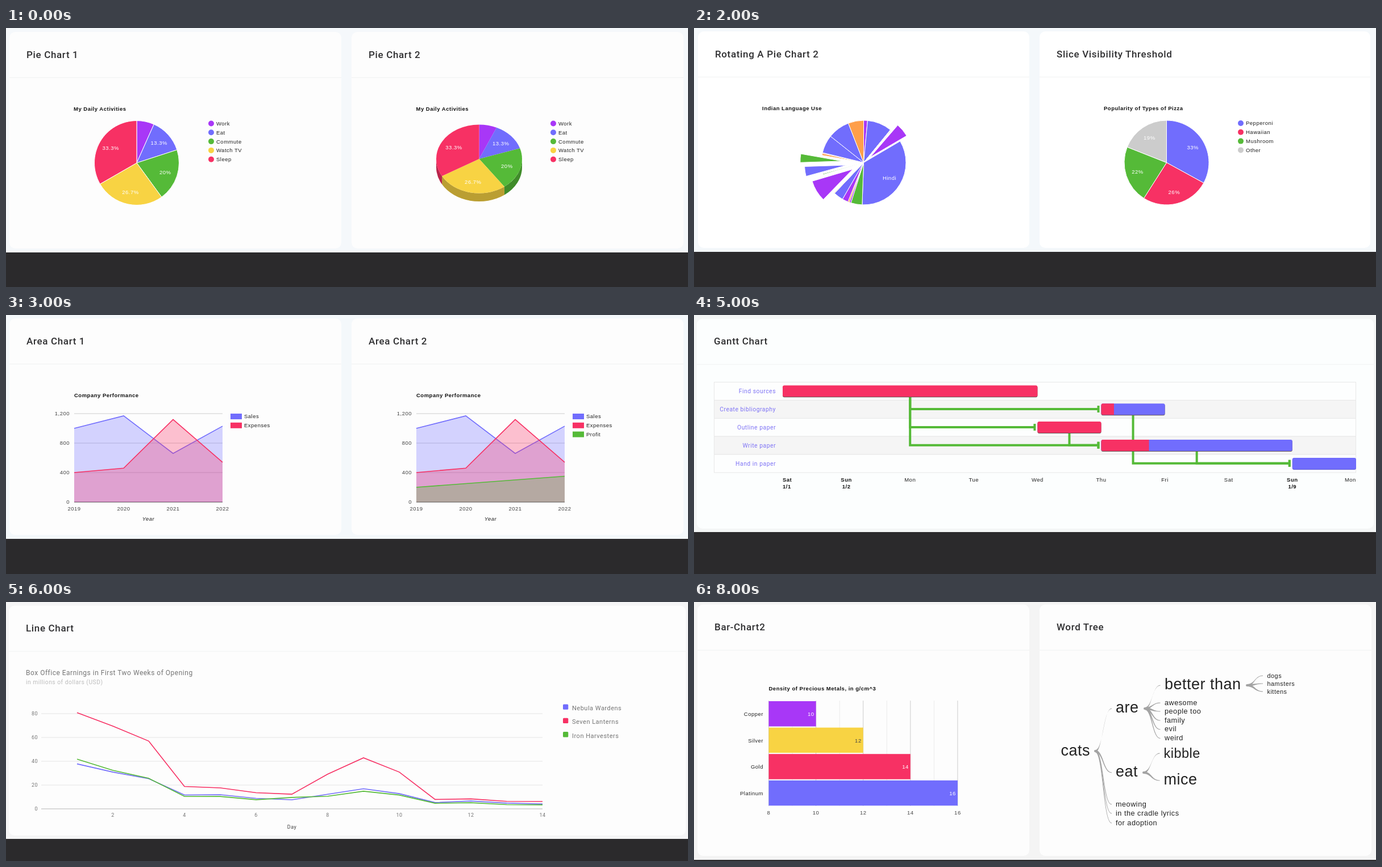
Write an HTML page that moves like this. It is 1200x457 px and loops after 9000 ms.

```html
<!DOCTYPE html>
<html lang="en">
<head>
<meta charset="utf-8">
<title>Chart gallery</title>
<style>
  html, body { margin: 0; width: 100%; height: 100%; overflow: hidden; background: #2b2a2c; }
  svg { display: block; width: 1200px; height: 457px; }
  text { font-family: "Liberation Sans", Arial, sans-serif; letter-spacing: .5px; fill: #222; white-space: pre; }
  .ui { font-family: Roboto, sans-serif; }
  .heading { font-family: Roboto, sans-serif; font-weight: 500; letter-spacing: .65px; fill: #2f2f31; }
  .bold { font-weight: 700; fill: #111; }
  .italic { font-style: italic; }
  .axis { fill: #444; }
  .soft { fill: #757575; }
  .faint { fill: #bdbdbd; }
  .light { fill: #fff; }
  .task { fill: #7f74f5; }
  .end { text-anchor: end; }
  .mid { text-anchor: middle; }
</style>
</head>
<body>
<svg id="stage" viewBox="0 0 1200 457"></svg>
<script>
const BLUE = '#716dfd', PINK = '#f73164', GREEN = '#55ba38', YELLOW = '#f8d343',
      PURPLE = '#a837f7', ORANGE = '#ff9f4a', GRAY = '#cccccc';
const SCENE_MS = 1000;
const join = (list, fn) => list.map(fn).join('');

// y is the middle of the capital letters.
const text = (x, y, content, size = 9.5, cls = '', extra = '') =>
  `<text x="${x}" y="${y + size * .36}" font-size="${size}" class="${cls}" ${extra}>${content}</text>`;
const sideText = (x, y, content, size) =>
  text(0, 0, content, size, 'italic mid', `transform="translate(${x} ${y}) rotate(-90)"`);
const rect = (x, y, w, h, fill, r = 0) =>
  `<rect x="${x}" y="${y}" width="${w}" height="${h}" rx="${r}" fill="${fill}"/>`;
const line = (x1, y1, x2, y2, color = '#ccc', width = 1) =>
  `<path d="M${x1} ${y1}L${x2} ${y2}" stroke="${color}" stroke-width="${width}"/>`;
const polyline = (points, color, width) =>
  `<polyline points="${points.join(' ')}" fill="none" stroke="${color}" stroke-width="${width}"/>`;

const card = (x, y, w, h, title, fill) => rect(x, y, w, h, fill, 10) +
  line(x, y + 80.5, x + w, y + 80.5, '#f0f2f2') + text(x + 30, y + 39.5, title, 17, 'heading');

function page({ bg, bottom, cards, fill = '#fdfdfd' }, content) {
  return rect(0, 0, 1200, bottom, bg) + rect(0, bottom, 1200, 457 - bottom, '#2b2a2c') +
    join(cards, ([x, y, w, h, title]) => card(x, y, w, h, title, fill)) + content;
}

const dotLegend = (x, y, entries) => join(entries, ([name, color], i) =>
  `<circle cx="${x}" cy="${y + i * 15.8}" r="5" fill="${color}"/>` + text(x + 9, y + i * 15.8, name));

// Angles run clockwise in degrees from twelve o'clock.
function pie({ cx, cy, rx = 74.5, ry = rx, values, colors, labels = [], offsets = {},
               start = 0, depth = 0, hole = 0, labelAt = .71 }) {
  const total = values.reduce((a, b) => a + b);
  const at = (deg, k, dy = 0) => {
    const a = deg * Math.PI / 180;
    return `${cx + rx * k * Math.sin(a)} ${cy - ry * k * Math.cos(a) + dy}`;
  };
  let angle = start, sides = '', tops = '', captions = '';
  values.forEach((value, i) => {
    const from = angle, to = angle += value / total * 360, middle = (from + to) / 2;
    const large = +(to - from > 180);
    const a = Math.max(from, 90), b = Math.min(to, 270);
    if (depth && b > a) {
      const side = `M${at(a, 1)}A${rx} ${ry} 0 0 1 ${at(b, 1)}L${at(b, 1, depth)}A${rx} ${ry} 0 0 0 ${at(a, 1, depth)}Z`;
      sides += `<path d="${side}" fill="${colors[i]}"/><path d="${side}" fill="#000" opacity=".25"/>`;
    }
    const [sx, sy] = at(middle, offsets[i] || 0).split(' ');
    tops += `<path d="M${cx} ${cy}L${at(from, 1)}A${rx} ${ry} 0 ${large} 1 ${at(to, 1)}Z" fill="${colors[i]}"
      transform="translate(${sx - cx} ${sy - cy})" ${depth ? '' : 'stroke="#fff"'}/>`;
    if (labels[i]) {
      const [x, y] = at(middle, labelAt).split(' ').map(Number);
      captions += text(x, y, labels[i], 9.5, 'light mid');
    }
  });
  const middle = hole ? `<circle cx="${cx}" cy="${cy}" r="${rx * hole}" fill="#fff"/>` : '';
  return sides + tops + middle + captions;
}

const years = [2019, 2020, 2021, 2022];
const company = [[1000, 1170, 660, 1030], [400, 460, 1120, 540], [200, 250, 300, 350]];
const activities = {
  values: [1, 2, 3, 4, 5],
  colors: [PURPLE, BLUE, GREEN, YELLOW, PINK],
  labels: ['', '13.3%', '20%', '26.7%', '33.3%']
};
const activityLegend = x => dotLegend(x, 168.5,
  ['Work', 'Eat', 'Commute', 'Watch TV', 'Sleep'].map((name, i) => [name, activities.colors[i]]));

const pieCharts = () => page(
  { bg: '#f5f8fb', bottom: 396, cards: [[6, 7, 584, 382, 'Pie Chart 1'], [608, 7, 584, 382, 'Pie Chart 2']] },
  text(119, 142.5, 'My Daily Activities', 9.5, 'bold') + pie({ cx: 230, cy: 238, ...activities }) + activityLegend(361) +
  text(721.5, 142.5, 'My Daily Activities', 9.5, 'bold') +
  pie({ cx: 832.5, cy: 231, rx: 75.5, ry: 60.5, depth: 14.5, labelAt: .68, ...activities }) + activityLegend(963));

const donutAndRotation = () => page(
  { bg: '#f5f8fb', bottom: 396, cards: [[6, 7, 584, 382, 'Pie Chart 3'], [608, 7, 584, 382, 'Rotating A Pie Chart 1']] },
  text(119, 142.5, 'My Daily Activities', 9.5, 'bold') +
  pie({ cx: 230, cy: 238, hole: .4, ...activities }) + activityLegend(361) +
  text(721.5, 142.5, 'Swiss Language Use (100 degree rotation)', 9.5, 'bold') +
  pie({ cx: 900, cy: 238, start: 100, values: [5.85, 1.66, .316, .0791],
        colors: [BLUE, PINK, GREEN, PURPLE], labels: ['German', 'French'] }));

function languagesAndPizza() {
  const speakers = [13, 83, 1.4, 2.3, 46, 300, 38, 5.5, 5, 20, 33, 1.5, 72, 2.9, 33, 29, .01, 6.5, 2.5, 61, 74, 52];
  const colors = [PURPLE, BLUE, GRAY, GRAY, PURPLE, BLUE, GREEN, PURPLE, ORANGE, PURPLE, BLUE,
    YELLOW, PURPLE, GREEN, BLUE, GREEN, BLUE, ORANGE, PINK, BLUE, BLUE, ORANGE];
  const toppings = [['Pepperoni', BLUE], ['Hawaiian', PINK], ['Mushroom', GREEN], ['Other', GRAY]];
  return page(
    { bg: '#f4f8fb', bottom: 395, fill: '#fff',
      cards: [[7, 6, 583, 382, 'Rotating A Pie Chart 2'], [608, 6, 582, 382, 'Slice Visibility Threshold']] },
    text(120, 142, 'Indian Language Use', 9.5, 'bold') +
    pie({ cx: 298.5, cy: 237.5, values: speakers, colors, labels: { 5: 'Hindi' },
          offsets: { 4: .2, 12: .3, 14: .4, 15: .5 } }) +
    text(721, 142, 'Popularity of Types of Pizza', 9.5, 'bold') +
    pie({ cx: 831.5, cy: 237.5, values: [33, 26, 22, 19], colors: toppings.map(t => t[1]),
          labels: ['33%', '26%', '22%', '19%'], labelAt: .72 }) +
    dotLegend(962, 168, toppings));
}

function areaCharts() {
  const area = (x, count) => {
    const px = i => x + i * 87, py = v => 330 - v * .13;
    return text(x, 142, 'Company Performance', 9.5, 'bold') +
      join([0, 400, 800, 1200], v => line(x, py(v), px(3), py(v), v ? '#ccc' : '#333') +
        text(x - 8, py(v), v.toLocaleString('en-US'), 9.5, 'axis end')) +
      join(company.slice(0, count), (row, s) => {
        const color = [BLUE, PINK, GREEN][s], points = row.map((v, i) => `${px(i)},${py(v)}`);
        return `<polygon points="${points.join(' ')} ${px(3)},330 ${x},330" fill="${color}" opacity=".3"/>` +
          polyline(points, color, 1.6);
      }) +
      join(years, (year, i) => text(px(i), 342, year, 9.5, 'axis mid')) +
      text(px(1.5), 360, 'Year', 9.5, 'italic mid') +
      join(['Sales', 'Expenses', 'Profit'].slice(0, count), (name, i) =>
        rect(px(3) + 14, 174 + i * 15.8, 20, 10, [BLUE, PINK, GREEN][i]) + text(px(3) + 38, 179 + i * 15.8, name));
  };
  return page(
    { bg: '#f4f8fb', bottom: 395, cards: [[6, 6, 584, 382, 'Area Chart 1'], [608, 6, 584, 382, 'Area Chart 2']] },
    area(120, 2) + area(722, 3));
}

function barAndColumns() {
  const cities = [
    ['New York City, NY', 8.175, 8.008], ['Los Angeles, CA', 3.792, 3.694], ['Chicago, IL', 2.695, 2.896],
    ['Houston, TX', 2.099, 1.953], ['Philadelphia, PA', 1.526, 1.517]];
  const px = millions => 166.5 + millions * 26.2;
  const bars = text(166, 155.5, 'Population of Largest U.S. Cities', 9.5, 'bold') +
    join([0, 2.5, 5, 7.5, 10], m => (m ? line(px(m), 177, px(m), 363) : '') +
      text(px(m), 374, (m * 1e6).toLocaleString('en-US'), 9.5, 'axis mid')) +
    join(cities, ([name, now, before], i) => {
      const y = 184 + i * 37.2;
      return rect(166.5, y, now * 26.2, 11.2, BLUE) + rect(166.5, y + 12, before * 26.2, 11.2, PINK) +
        text(157, y + 11.5, name, 9.5, 'end');
    }) +
    line(166.5, 177, 166.5, 363, '#333') +
    join(['2020 Population', '2018 Population'], (name, i) =>
      rect(438.5, 176.5 + i * 15.8, 19.5, 9.8, [BLUE, PINK][i]) + text(462, 181.5 + i * 15.8, name)) +
    sideText(53, 270, 'City') + text(297.5, 400, 'Total Population', 9.5, 'italic mid');

  const columns = text(638, 125, 'Company Performance', 12, 'ui soft') +
    text(638, 141.5, 'Sales, Expenses, and Profit: 2019-2022', 10.3, 'ui faint') +
    join(['0', '200', '400', '600', '800', '1K', '1.2K'], (label, i) => {
      const y = 381 - i * 33.4;
      return line(663, y, 1071.5, y, i ? '#e4e4e4' : '#b5b5b5') + text(657.5, y, label, 9, 'ui soft end');
    }) +
    join(company, (row, s) => join(row, (value, i) => {
      const x = 671.3 + i * 107.3 + s * 23.3, y = 381 - value * .167;
      return `<path d="M${x} 380.5V${y + 1.5}q0-1.5 1.5-1.5h19.5q1.5 0 1.5 1.5V380.5Z" fill="${[BLUE, PINK, GREEN][s]}"/>`;
    })) +
    join(years, (year, i) => text(706 + i * 107.3, 391, year, 9, 'ui soft mid')) +
    text(867, 415, 'Year', 9, 'ui axis mid') +
    '<clipPath id="legend"><path d="M1100 170h63v80h-63z"/></clipPath><g clip-path="url(#legend)">' +
    join(['Sales', 'Expenses', 'Profit'], (name, i) => rect(1102.5, 180.5 + i * 24.3, 9.3, 9.3, [BLUE, PINK, GREEN][i], 1.5) +
      text(1118, 187 + i * 24.3, name, 11, 'ui soft')) + '</g>';
  return page(
    { bg: '#f5faf5', bottom: 457, cards: [[5, 6.5, 585, 444, 'Basic Bar Chart'], [608, 6.5, 585, 444, 'Material Design']] },
    bars + columns);
}

function gantt() {
  const dayX = day => 156 + day * 112.1, rowY = row => 118.5 + row * 31.9;
  // name, first day, last day, share complete
  const tasks = [['Find sources', 0, 4, 1], ['Create bibliography', 5, 6, .2], ['Outline paper', 4, 5, 1],
    ['Write paper', 5, 8, .25], ['Hand in paper', 8, 9, 0]];
  const links = [[0, 1], [0, 2], [0, 3], [2, 3], [1, 4], [3, 4]];
  const days = ['Sat', 'Sun', 'Mon', 'Tue', 'Wed', 'Thu', 'Fri', 'Sat', 'Sun', 'Mon'];
  const dates = { 0: '1/1', 1: '1/2', 8: '1/9' };
  return page(
    { bg: '#f4f6f6', bottom: 383, fill: '#fcfefe', cards: [[5, 6.5, 1191, 370.5, 'Gantt Chart']] },
    join(tasks, (task, i) => `<rect x="35.5" y="${rowY(i)}" width="1129" height="31.9"
      fill="${i % 2 ? '#f5f5f5' : '#fdfefe'}" stroke="#e8e8e8"/>` + text(144, rowY(i) + 16, task[0], 10.4, 'ui task end')) +
    join(links, ([a, b]) => {
      const x = dayX((tasks[a][1] + tasks[a][2]) / 2), y = rowY(b) + 15.6, tip = dayX(tasks[b][1]) - 5;
      return `<path d="M${x} ${rowY(a) + 26}V${y}H${tip}M${tip} ${y - 6}v12" fill="none" stroke="${GREEN}" stroke-width="4"/>`;
    }) +
    join(tasks, ([, from, to, done], i) => {
      const x = dayX(from), y = rowY(i) + 5.8, w = dayX(to) - x, cut = w * done;
      return rect(x, y + 1, w, 20, done ? '#655' : '#5c58d0', 3) + rect(x, y, w, 20, done === 1 ? PINK : BLUE, 3) +
        (done && done < 1 ? `<path d="M${x + cut} ${y}h${3 - cut}q-3 0-3 3v14q0 3 3 3h${cut - 3}z" fill="${PINK}"/>` : '');
    }) +
    join(days, (name, i) => {
      const cls = (i === 0 ? '' : i === 9 ? 'end ' : 'mid ') + (dates[i] ? 'bold' : '');
      return text(dayX(i), 291, name, 9.5, cls) + (dates[i] ? text(dayX(i), 302.5, dates[i], 9.5, cls) : '');
    }));
}

function lineChart() {
  const series = [
    ['Nebula Wardens', BLUE, [37.8, 30.9, 25.4, 11.7, 11.9, 8.8, 7.6, 12.3, 16.9, 12.8, 5.3, 6.6, 4.8, 4.2]],
    ['Seven Lanterns', PINK, [80.8, 69.5, 57, 18.8, 17.6, 13.6, 12.3, 29.2, 42.9, 30.9, 7.9, 8.4, 6.3, 6.2]],
    ['Iron Harvesters', GREEN, [41.8, 32.4, 25.7, 10.5, 10.4, 7.7, 9.6, 10.6, 14.8, 11.6, 4.7, 5.2, 3.6, 3.4]]];
  const px = day => 62 + day * 63, py = v => 365 - v * 2.1;
  return page(
    { bg: '#f5f5f6', bottom: 418, cards: [[5, 6.5, 1191, 405.5, 'Line Chart']] },
    text(35, 125, 'Box Office Earnings in First Two Weeks of Opening', 12, 'ui soft') +
    text(35, 141.5, 'in millions of dollars (USD)', 10.3, 'ui faint') +
    join([0, 20, 40, 60, 80], v => line(62, py(v), px(14), py(v), v ? '#e4e4e4' : '#b5b5b5') +
      text(56, py(v), v, 9, 'ui soft end')) +
    join([2, 4, 6, 8, 10, 12, 14], day => text(px(day), 376, day, 9, 'ui soft mid')) +
    text(px(7), 397, 'Day', 9, 'ui axis mid') +
    join(series, ([name, color, values], i) => polyline(values.map((v, d) => `${px(d + 1)},${py(v)}`), color, 1.6) +
      rect(980, 180.5 + i * 24.3, 9.3, 9.3, color, 1.5) + text(996, 187 + i * 24.3, name, 11, 'ui soft')));
}

function comboChart() {
  const months = ['2018/05', '2019/06', '2020/07', '2021/08', '2022/09'];
  const countries = [
    [BLUE, [165, 135, 157, 139, 136]], [GREEN, [938, 1120, 1167, 1110, 691]], [PINK, [522, 599, 587, 615, 629]],
    [PURPLE, [998, 1268, 807, 968, 1026]], [YELLOW, [450, 288, 397, 215, 366]]];
  const average = [614.6, 682, 623, 609.4, 569.6];
  const px = i => 243.6 + i * 178.1, py = v => 297.7 - v * .0928;
  const legend = [['Bolivia', 164], ['Ecuador', 182.3], ['Madagascar', 200.4], ['Papua New', 218.5], ['Rwanda', 252]];
  return page(
    { bg: '#f6f5f6', bottom: 380, cards: [[5, 2.5, 1189, 370, 'ComboChart']] },
    text(154, 136, 'Monthly Coffee Production by Country', 11, 'bold') +
    join([250, 750, 1250], v => line(154, py(v), 1045, py(v), '#ebebeb')) +
    join([0, 500, 1000, 1500], v => line(154, py(v), 1045, py(v)) +
      text(143.5, py(v) + .5, v.toLocaleString('en-US'), 11, 'axis end')) +
    join(countries, ([color, cups], s) => join(cups, (v, i) =>
      rect(px(i) - 55.4 + s * 22.2, py(v), 21.7, v * .0928, color))) +
    line(154, 297.7, 1045, 297.7, '#333') +
    polyline(average.map((v, i) => `${px(i)},${py(v)}`), BLUE, 1.6) +
    join(months, (month, i) => text(px(i), 311, month, 11, 'mid')) +
    text(599.5, 329, 'Month', 11, 'italic mid') + sideText(74, 228, 'Cups', 11) +
    join(legend, ([name, y], i) => rect(1056, y - 5.7, 23, 11.4, countries[i][0]) + text(1083.5, y, name, 11)) +
    text(1083.5, 233.5, 'Guinea', 11) + line(1056, 270, 1079, 270, BLUE, 1.6) + text(1083.5, 270, 'Average', 11));
}

function metalsAndWords() {
  const metals = [['Copper', 10, PURPLE], ['Silver', 12, YELLOW], ['Gold', 14, PINK], ['Platinum', 16, BLUE]];
  const px = v => 131.5 + (v - 8) * 41.55;
  const bars = text(131.5, 153, 'Density of Precious Metals, in g/cm^3', 9.5, 'bold') +
    join([9, 11, 13, 15], v => line(px(v), 174, px(v), 360, '#ebebeb')) +
    join([8, 10, 12, 14, 16], v => line(px(v), 174, px(v), 360) + text(px(v), 371.5, v, 9.5, 'axis mid')) +
    join(metals, ([name, v, color], i) => {
      const y = 175 + i * 46.6;
      return rect(131.5, y, px(v) - 131.5, 44.5, color) + text(122, y + 22.5, name, 9.5, 'end') +
        text(px(v) - 3, y + 22.5, v, 9.5, 'end ' + (color === YELLOW ? 'axis' : 'light'));
    });

  const branch = (x0, y0, x1, ends) => join(ends, y1 => {
    const m = (x0 + x1) / 2;
    return `<path d="M${x0} ${y0 - 2}C${m} ${y0 - 2} ${m} ${y1 - .5} ${x1} ${y1 - .5}v1C${m - 1} ${y1 + .5} ${m - 1} ${y0 + 2} ${x0} ${y0 + 2}Z"/>`;
  }) + `<circle cx="${x0}" cy="${y0}" r="2"/>`;
  const word = (x, baseline, content, size) => text(x, baseline - size * .36, content, size);
  const words = (x, size, entries) => join(entries, ([content, baseline]) => word(x, baseline, content, size));
  const tree = '<g fill="#a3a3a3">' +
    branch(706, 263, 735, [188, 301, 357, 373, 390]) +
    branch(793, 188, 820.5, [147, 178, 193, 209, 225, 240.5]) +
    branch(791, 301, 819.5, [267, 315]) + branch(973, 147, 1001, [130, 144, 158]) + '</g>' +
    word(645.5, 270.5, 'cats', 27) + words(742, 27, [['are', 195], ['eat', 308]]) +
    word(828, 154, 'better than', 27) + word(826.5, 275, 'kibble', 23.5) + word(826.5, 322, 'mice', 27) +
    words(1008.5, 10.9, [['dogs', 134], ['hamsters', 147.5], ['kittens', 162]]) +
    words(828, 12.7, [['awesome', 181.5], ['people too', 196.5], ['family', 212.5], ['evil', 228], ['weird', 243.5]]) +
    words(742, 12.7, [['meowing', 361], ['in the cradle lyrics', 377], ['for adoption', 394]]);
  return page(
    { bg: '#f4f4f4', bottom: 455, cards: [[6, 4.5, 584, 443.5, 'Bar-Chart2'], [608, 4.5, 584, 443.5, 'Word Tree']] },
    bars + tree);
}

const scenes = [pieCharts, donutAndRotation, languagesAndPizza, areaCharts, barAndColumns,
  gantt, lineChart, comboChart, metalsAndWords].map(draw => draw());
const stage = document.getElementById('stage');
let shown = -1;

function show(now) {
  const index = Math.floor(now / SCENE_MS) % scenes.length;
  if (index !== shown) stage.innerHTML = scenes[shown = index];
}

const startTime = performance.now();
function tick() {
  show(performance.now() - startTime);
  requestAnimationFrame(tick);
}
tick();
</script>
</body>
</html>
```
